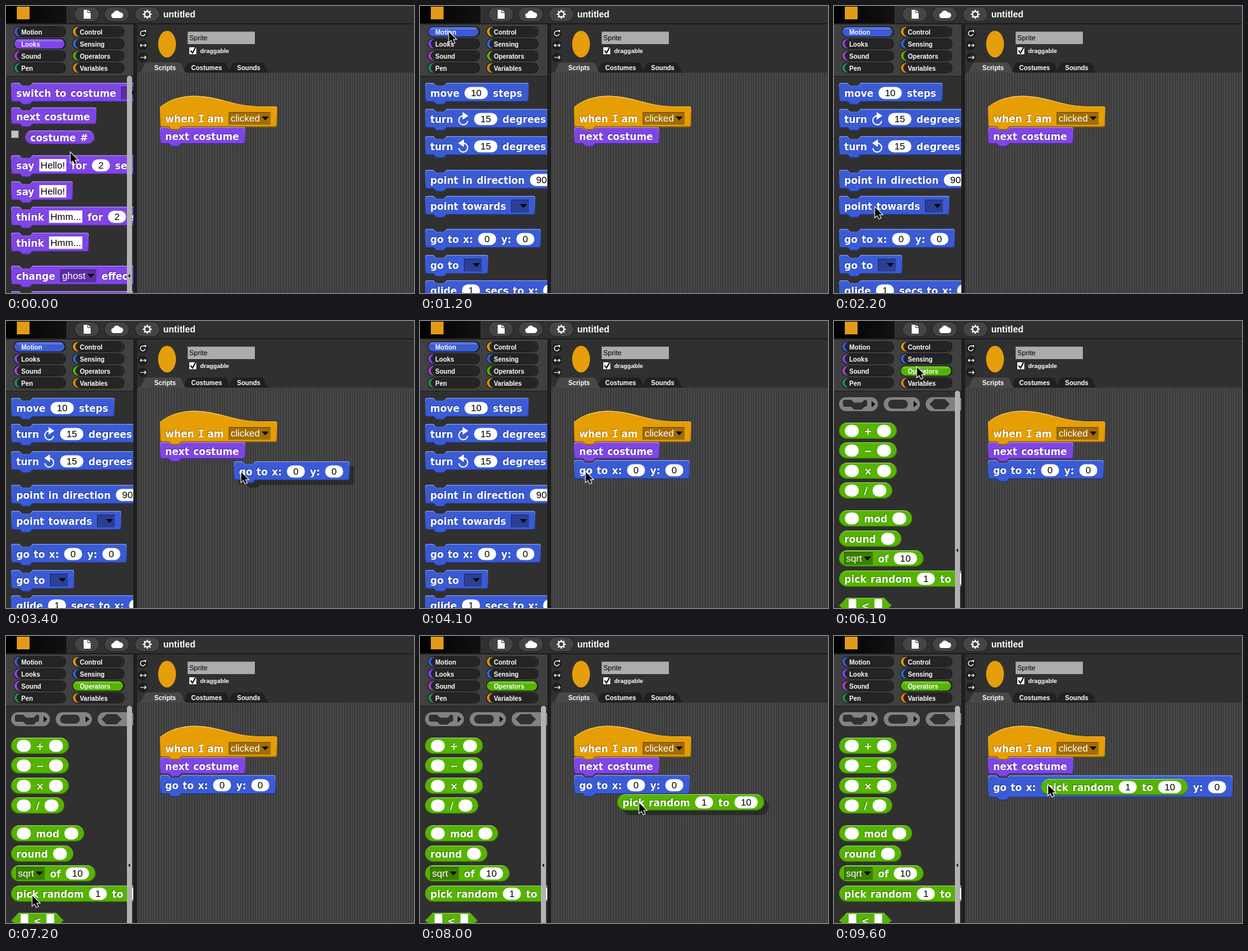
Write an HTML page with a canvas that moves like this. It is 641x452 px and loops after 9.7 s.

```html
<!DOCTYPE html>
<html lang="en">
<head>
<meta charset="utf-8">
<title>Block editor</title>
<style>
html, body { margin: 0; width: 100%; height: 100%; overflow: hidden; background: #1c1c1c; }
canvas { display: block; }
</style>
</head>
<body>
<canvas id="stage" width="641" height="452"></canvas>
<script>
const ctx = document.getElementById('stage').getContext('2d');
ctx.wordSpacing = '1.3px';
const LOOP = 9700, STEP = 100;
const MOTION = '#3a5bd5', LOOKS = '#7f45e6', OPERATORS = '#55b400', HAT = '#e69e05';
const PALETTE = '#303030', SCRIPTS = '#484848';
const LABEL = 'bold 15px "DejaVu Sans", sans-serif';
const SERIFED = 'bold 15px "DejaVu Sans Mono", monospace';
const SLOT = '15px "Liberation Sans", Arial, sans-serif';
const UI = 'bold 10px "Liberation Sans", Arial, sans-serif';
const GAP = 8;
const GOTO = 'go to x: (0) y: (0)', PICK = 'pick random (1) to (10)';

const CATEGORIES = [
  ['Motion', MOTION], ['Looks', LOOKS], ['Sound', '#a042c4'], ['Pen', '#1f8a5c'],
  ['Control', '#dc9410'], ['Sensing', '#2f66d8'], ['Operators', OPERATORS], ['Variables', '#d8841a']
];

// Rows: vertical centre, block text, shape, left edge
const PALETTES = {
  Looks: [
    [137, 'switch to costume {}'], [174, 'next costume'], [207, 'costume #', 'pill', 30],
    [251, 'say [Hello!] for (2) secs'], [292, 'say [Hello!]'],
    [332, 'think [Hmm...] for (2) secs'], [373, 'think [Hmm...]'],
    [425, 'change {ghost} effect by (25)'], [465, 'set {ghost} effect to (0)']
  ],
  Motion: [
    [137, 'move (10) steps'], [178, 'turn @r (15) degrees'], [221, 'turn @l (15) degrees'],
    [274, 'point in direction (90)'], [315, 'point towards {}'],
    [367, GOTO], [408, 'go to {}'], [448, 'glide (1) secs to x: (0) y: (0)']
  ],
  Operators: [
    [173, '() + ()', 'pill'], [204, '() − ()', 'pill'], [236, '() × ()', 'pill'], [267, '() / ()', 'pill'],
    [311, '() mod ()', 'pill'], [343, 'round ()', 'pill'], [374, '{sqrt} of (10)', 'pill'],
    [406, PICK, 'pill'], [448, '[] < []', 'hex']
  ]
};

// Cursor path: time, x, y of the tip
const PATH = [
  [0, 101, 231], [100, 101, 231], [800, 45, 41], [1200, 45, 41], [2200, 64, 317], [2500, 19, 369],
  [2600, 19, 369], [3400, 369, 238], [3500, 380, 238], [4000, 260, 238], [4300, 260, 238],
  [5400, 128, 70], [6200, 130, 73], [7000, 40, 408], [7200, 41, 409], [7300, 42, 410],
  [8000, 344, 263], [8500, 336, 235], [9700, 336, 235]
];

function cursorAt(t) {
  const i = Math.max(1, PATH.findIndex(p => p[0] >= t));
  const [t0, x0, y0] = PATH[i - 1], [t1, x1, y1] = PATH[i];
  const k = (t - t0) / (t1 - t0), e = k * k * (3 - 2 * k);
  return [x0 + (x1 - x0) * e, y0 + (y1 - y0) * e];
}

function text(s, x, y, font, color) {
  ctx.font = font;
  ctx.fillStyle = color;
  ctx.fillText(s, x, y);
}

function measure(s, font) {
  ctx.font = font;
  return ctx.measureText(s).width;
}

function rect(x, y, w, h, color, r = 0) {
  ctx.fillStyle = color;
  ctx.beginPath();
  ctx.roundRect(x, y, w, h, r);
  ctx.fill();
}

function fillPath(d, color) {
  ctx.fillStyle = color;
  ctx.fill(new Path2D(d));
}

function strokePath(d, color, width = 1.5) {
  ctx.strokeStyle = color;
  ctx.lineWidth = width;
  ctx.stroke(new Path2D(d));
}

const fontOf = run => run === 'I' ? SERIFED : LABEL;
const labelWidth = s => s.split(/(I)/).reduce((w, run) => w + measure(run, fontOf(run)), 0);

function label(s, x, cy) {
  for (const run of s.split(/(I)/)) {
    text(run, x - 1, cy + 4.5, fontOf(run), 'rgba(0,0,0,.35)');
    text(run, x, cy + 5.5, fontOf(run), '#fff');
    x += measure(run, fontOf(run));
  }
}

const tokens = spec => spec.match(/\(.*?\)|\[.*?\]|\{.*?\}|\|.*?\||@.|[^([{@|]+/g)
  .map(s => s.trim()).filter(Boolean);

function tokenWidth(token) {
  const inner = token.slice(1, -1), w = measure(inner, SLOT);
  switch (token[0]) {
    case '(': return inner ? w + 20 : 22;
    case '[': return inner ? w + 4 : 12;
    case '{': return inner ? w + 20 : 28;
    case '|': return blockWidth(inner);
    case '@': return 17;
    default: return labelWidth(token);
  }
}

const blockWidth = (spec, shape) => tokens(spec)
  .reduce((w, token) => w + tokenWidth(token) + GAP, shape === 'hex' ? 22 : 10);

function blockHeight(spec, shape) {
  if (shape === 'pill') return spec === 'costume #' ? 22 : 26;
  if (shape === 'hex') return 24;
  return spec.includes('|') ? 35 : /[([{]/.test(spec) ? 30 : 26.5;
}

function outline(shape, x, y, w, h) {
  if (shape === 'pill') {
    const p = new Path2D();
    p.roundRect(x, y, w, h, h / 2);
    return p;
  }
  if (shape === 'hex') {
    const m = h / 2;
    return new Path2D(`M${x} ${y + m}l${m} ${-m}H${x + w - m}l${m} ${m}l${-m} ${m}H${x + m}Z`);
  }
  const top = shape === 'hat'
    ? `M${x} ${y}C${x + 20} ${y - 17} ${x + 50} ${y - 21} ${x + 80} ${y - 15}S${x + 125} ${y - 1} ${x + 160} ${y - 1}`
    : `M${x} ${y + 3}q0-3 3-3H${x + 13}l4.5 4.5h12l4.5-4.5`;
  return new Path2D(`${top}H${x + w - 3}q3 0 3 3V${y + h - 3}q0 3-3 3H${x + 34}l-4.5 4.5h-12l-4.5-4.5H${x + 3}q-3 0-3-3Z`);
}

function drawToken(token, x, cy, w) {
  const inner = token.slice(1, -1);
  switch (token[0]) {
    case '(':
      rect(x, cy - 9.5, w, 19, '#fff', 9.5);
      text(inner, x + 10, cy + 5, SLOT, '#000');
      break;
    case '[':
      rect(x, cy - 10, w, 19.5, '#fff');
      text(inner, x + 2, cy + 5, SLOT, '#000');
      break;
    case '{':
      rect(x, cy - 10, w, 20, 'rgba(0,0,0,.3)');
      strokePath(`M${x + .5} ${cy + 10}V${cy - 9.5}H${x + w}`, 'rgba(0,0,0,.35)', 1);
      text(inner, x + 3, cy + 5, SLOT, '#fff');
      fillPath(`M${x + w - 14} ${cy - 3}h11l-5.5 6Z`, '#000');
      break;
    case '|':
      block('pill', OPERATORS, x, cy, inner);
      break;
    case '@':
      ctx.save();
      ctx.translate(x + 8, cy + 2);
      if (token === '@l') ctx.scale(-1, 1);
      strokePath('M0-7A7 7 0 1 0 7 1', '#fff', 1.8);
      fillPath('M-1-13L8-7L-1-1Z', '#fff');
      ctx.restore();
      break;
    default:
      label(token, x, cy);
  }
}

function drawTokens(spec, x, cy) {
  for (const token of tokens(spec)) {
    const w = tokenWidth(token);
    drawToken(token, x, cy, w);
    x += w + GAP;
  }
}

function bevel(path, color, edge) {
  ctx.save();
  ctx.fillStyle = color;
  ctx.fill(path);
  ctx.clip(path);
  ctx.strokeStyle = edge;
  ctx.lineWidth = 2.5;
  ctx.stroke(path);
  ctx.restore();
}

function shade(x0, y0, x1, y1, ...colors) {
  const g = ctx.createLinearGradient(x0, y0, x1, y1);
  colors.forEach((c, i) => g.addColorStop(i / (colors.length - 1), c));
  return g;
}

function block(shape, color, x, cy, spec, lifted) {
  const h = blockHeight(spec, shape), w = blockWidth(spec, shape);
  const y = cy - h / 2 - (shape === 'command' ? 1 : 0);
  const path = outline(shape, x, y, w, h);
  if (lifted) {
    ctx.save();
    ctx.translate(7, 7);
    ctx.fillStyle = 'rgba(0,0,0,.35)';
    ctx.fill(path);
    ctx.restore();
  }
  bevel(path, color, shade(0, y, 0, y + h, 'rgba(255,255,255,.4)', 'rgba(0,0,0,0)', 'rgba(0,0,0,.45)'));
  drawTokens(spec, x + (shape === 'hex' ? 15 : spec[0] === '(' ? 9 : 8), cy);
}

function hat() {
  const spec = 'when I am {clicked}';
  const path = outline('hat', 242, 159, blockWidth(spec), 31.5);
  bevel(path, HAT, shade(0, 141, 0, 191, '#f8d27a', HAT, '#8c6000'));
  drawTokens(spec, 250, 177);
}

function topBar() {
  rect(0, 0, 641, 27, PALETTE);
  rect(0, 0, 95, 27, shade(0, 0, 95, 0, '#000', '#121212'));
  rect(17, 1, 20, 20, '#e39a18');
  for (const x of [107, 154, 202]) {
    rect(x, 1, 40, 24, '#222', 12);
    rect(x + 1, 2, 38, 22, '#444', 11);
  }
  fillPath('M122 6h6v5h5v9h-11ZM129 6l4 4h-4Z', '#fff');
  fillPath('M170 19a4 4 0 0 1-1-8a5.5 5.5 0 0 1 10-1a4.5 4.5 0 0 1 1 9Z', '#fff');
  for (let i = 0; i < 8; i++) {
    const c = Math.cos(i * Math.PI / 4), s = Math.sin(i * Math.PI / 4);
    strokePath(`M${222 + 4 * c} ${13 + 4 * s}L${222 + 7 * c} ${13 + 7 * s}`, '#fff', 2.2);
  }
  strokePath('M217.8 13a4.2 4.2 0 1 0 8.4 0a4.2 4.2 0 1 0-8.4 0', '#fff', 2);
  text('untitled', 247, 18, 'bold 14px "Liberation Sans", Arial, sans-serif', '#fff');
}

function categories(selected, mx, my) {
  rect(0, 29, 200, 81, '#404040');
  CATEGORIES.forEach(([name, color], i) => {
    const x = i < 4 ? 13 : 105, y = 33 + i % 4 * 19;
    const hover = mx >= x && mx < x + 80 && my >= y - 1 && my < y + 16;
    rect(x - 1, y - 1, 82, 17, '#1a1a1a', 8);
    rect(x, y, 79, 15, color, 7.5);
    if (name !== selected) rect(x + 4, y, 75, 15, hover ? '#080808' : '#242424', 7.5);
    else rect(x + 3, y + 1, 73, 3, 'rgba(255,255,255,.18)', 2);
    text(name, x + 11, y + 11.5, UI, '#fff');
  });
}

function ringRow() {
  for (const [x, w] of [[8, 61], [78, 57], [144, 61]]) rect(x, 120, w, 22, '#828282', 11);
  ctx.fillStyle = PALETTE;
  ctx.fill(outline('command', 14, 124, 38, 11));
  ctx.fill(outline('pill', 85, 124, 31, 14));
  ctx.fill(outline('hex', 150, 123, 32, 16));
  for (const x of [59, 125, 191]) fillPath(`M${x} 126l6 5l-6 5Z`, '#111');
}

function palette(name) {
  ctx.save();
  ctx.beginPath();
  ctx.rect(0, 111, 200, 341);
  ctx.clip();
  rect(0, 111, 200, 341, PALETTE);
  const color = CATEGORIES.find(c => c[0] === name)[1];
  if (name === 'Operators') ringRow();
  for (const [cy, spec, shape = 'command', x = 8] of PALETTES[name]) block(shape, color, x, cy, spec);
  if (name === 'Looks') {
    rect(8, 196, 12, 12, '#8c8c8c');
    rect(9, 197, 10, 10, '#c4c4c4');
  }
  ctx.restore();
  if (name !== 'Motion') {
    rect(190, 110, 8, 350, '#b2b2b2', 4);
    const y = name === 'Looks' ? 425 : 361;
    fillPath(`M195 ${y - 3}v6l-3-3Z`, '#000');
  }
}

function spriteBar() {
  rect(206, 29, 435, 76, PALETTE);
  for (const y of [43, 62, 81]) rect(207.5, y - 7.5, 15, 15, '#1e1e1e', 7.5);
  strokePath('M217 40a3.8 3.8 0 1 0 1.6 4', '#fff', 1.3);
  fillPath('M216 38h4v4Z', '#fff');
  strokePath('M211 62h9M213 60l-2 2l2 2M218 60l2 2l-2 2M211 81h9M217.5 78.5l2.5 2.5l-2.5 2.5', '#fff', 1.2);
  ctx.fillStyle = '#e69e0c';
  ctx.beginPath();
  ctx.ellipse(253, 60, 14, 21, 0, 0, 7);
  ctx.fill();
  rect(285, 40, 106, 20, '#777');
  rect(286, 41, 105, 19, '#acacac');
  text('Sprite', 288, 54, '11px "Liberation Sans", Arial, sans-serif', '#000');
  rect(288, 65, 11, 11, '#fff');
  strokePath('M290 70l3 4l5-9', '#000', 1.8);
  text('draggable', 305, 74, 'bold 9.5px "Liberation Sans", Arial, sans-serif', '#fff');
  const tab = (x, w, color) =>
    fillPath(`M${x} 105C${x + 8} 105 ${x + 6} 89 ${x + 14} 89H${x + w - 14}C${x + w - 6} 89 ${x + w - 8} 105 ${x + w} 105Z`, color);
  tab(346, 69, '#202020');
  tab(275, 81, '#202020');
  tab(208, 77, SCRIPTS);
  text('Scripts', 233, 101, UI, '#fff');
  text('Costumes', 291, 101, UI, '#fff');
  text('Sounds', 363, 101, UI, '#fff');
}

function scripts(t) {
  rect(206, 105, 435, 347, SCRIPTS);
  for (let x = 207; x < 641; x += 4) rect(x, 105, 2, 347, '#3b3b3b');
  if (t >= 8700) block('command', MOTION, 242, 238, `go to x: |${PICK}| y: (0)`);
  else if (t >= 4100) block('command', MOTION, 242, 235, GOTO);
  block('command', LOOKS, 242, 205, 'next costume');
  hat();
  if (t >= 3800 && t < 4100) rect(242, 218, 133, 4, '#fff');
  if (t >= 8300 && t < 8700) {
    ctx.strokeStyle = '#fff';
    ctx.lineWidth = 3;
    ctx.stroke(outline('pill', 324, 224.5, 31, 21));
  }
}

function cursor(x, y) {
  const d = 'M0 0V15.5L3.6 12.2L6.2 18L8.8 16.9L6.3 11.2H11Z';
  ctx.save();
  ctx.translate(x + .5, y);
  strokePath(d, '#fff', 2);
  fillPath(d, '#000');
  ctx.restore();
}

function draw(t) {
  const [mx, my] = cursorAt(t);
  const selected = t < 1100 ? 'Looks' : t < 6100 ? 'Motion' : 'Operators';
  rect(0, 0, 641, 452, '#1e1e1e');
  topBar();
  categories(selected, mx, my);
  palette(selected);
  spriteBar();
  scripts(t);
  if (t > 2600 && t < 4100) block('command', MOTION, mx - 11, my - 1, GOTO, true);
  if (t > 7300 && t < 8700) block('pill', OPERATORS, mx - 34, my - 1, PICK, true);
  cursor(mx, my);
}

let shown = -1;
function tick(now) {
  const t = Math.floor(now % LOOP / STEP) * STEP;
  if (t !== shown) draw(shown = t);
  requestAnimationFrame(tick);
}
tick(performance.now());
</script>
</body>
</html>
```
